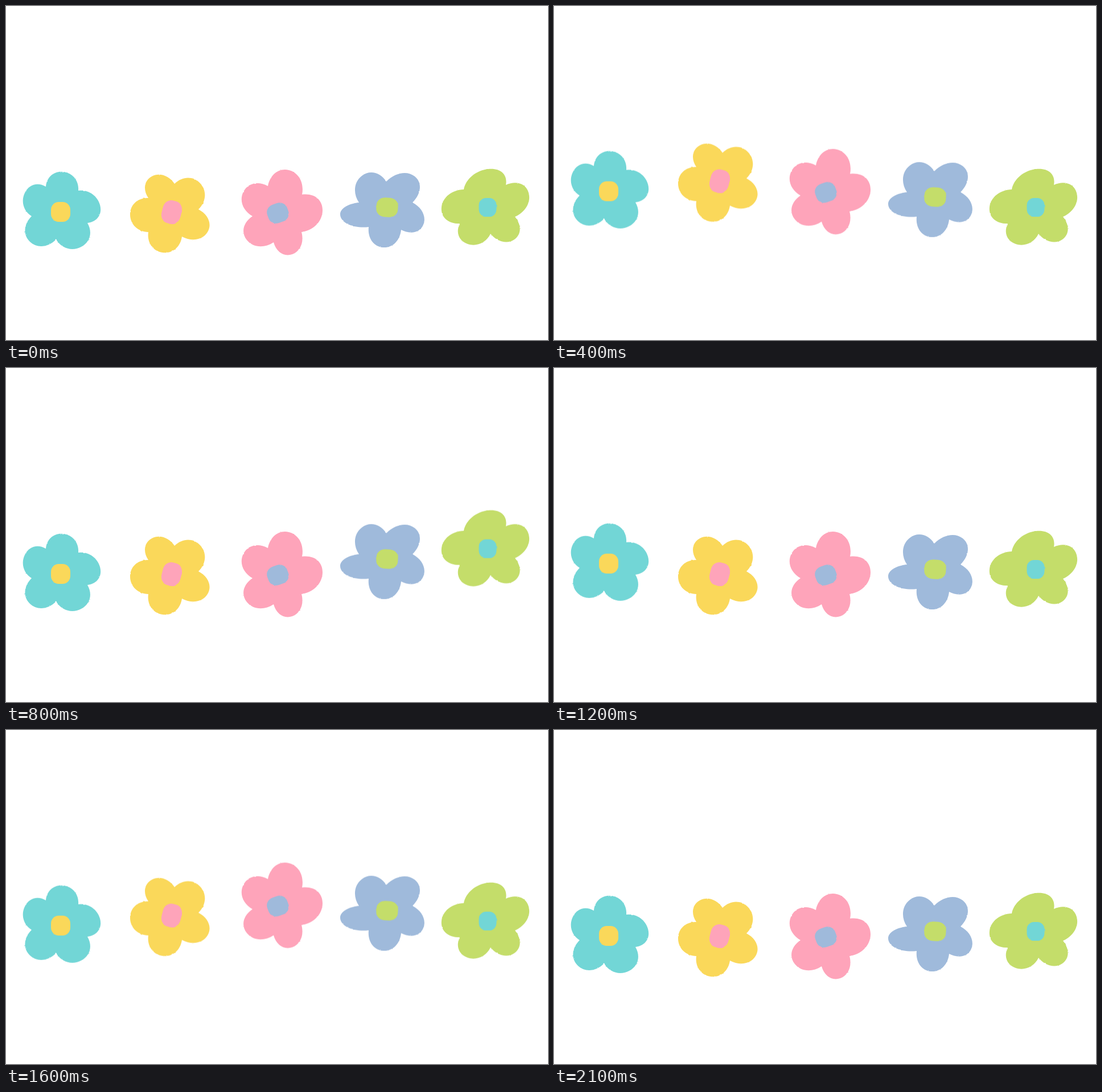
Animation, 952 px wide and 588 px high, one loop 2200 ms. Source, as an HTML page:

```html
<!DOCTYPE html>
<html lang="en">
<head>
<meta charset="utf-8">
<title>Bouncing flowers</title>
<style>
  html, body { margin: 0; width: 100%; height: 100%; overflow: hidden; background: #fff; }
  svg { display: block; width: 952px; height: 588px; }
  .flower { animation: hop 1100ms infinite; animation-delay: calc(var(--i) * 100ms); }
  /* Three hard steps up, three down, then rest. */
  @keyframes hop {
    0% { transform: translateY(0); animation-timing-function: steps(3, end); }
    27.2727% { transform: translateY(-54.6px); animation-timing-function: steps(3, end); }
    54.5454%, 100% { transform: translateY(0); }
  }
</style>
</head>
<body>
<svg id="stage" viewBox="0 0 952 588">
  <filter id="rough" x="-5%" y="-5%" width="110%" height="110%" color-interpolation-filters="sRGB">
    <feTurbulence type="fractalNoise" baseFrequency="0.2" numOctaves="2" seed="4"/>
    <feDisplacementMap in="SourceGraphic" scale="2" xChannelSelector="R" yChannelSelector="G"/>
  </filter>
</svg>
<script>
const teal = '#72d6d6', yellow = '#fad85a', pink = '#fea4ba', blue = '#9fbadb', green = '#c4dd6a';
const FULLNESS = 0.58; // 0.55 would make each petal exactly half an ellipse

// notches: where petals meet; tips: the outermost point of the petal after each notch.
const flowers = [
  {
    fill: teal, heart: yellow,
    notches: [[70, 318], [127, 325], [143, 382], [88, 411], [45, 370]],
    tips: [[101, 292], [165, 350], [132, 424], [42, 415], [33, 329]],
    core: { x: 96, y: 362.5, w: 34, h: 35, tilt: 0 }
  },
  {
    fill: yellow, heart: pink,
    notches: [[250, 338], [296, 313], [338, 358], [309, 406], [250, 398]],
    tips: [[256, 300], [341, 312], [354, 398], [275, 434], [218, 367]],
    core: { x: 291, y: 363, w: 34, h: 41, tilt: 14 }
  },
  {
    fill: pink, heart: blue,
    notches: [[460, 317], [520, 332], [519, 398], [470, 416], [433, 370]],
    tips: [[497, 289], [556, 360], [503, 437], [423, 412], [417, 327]],
    core: { x: 477.5, y: 364.5, w: 37, h: 34, tilt: -20 }
  },
  {
    fill: blue, heart: green,
    notches: [[620, 346], [668, 309], [714, 346], [694, 394], [637, 389]],
    tips: [[625, 299], [718, 300], [733, 385], [662, 425], [588, 372]],
    core: { x: 669.5, y: 354.5, w: 38, h: 34, tilt: 4 }
  },
  {
    fill: green, heart: teal,
    notches: [[804, 323], [878, 315], [894, 371], [851, 401], [797, 383]],
    tips: [[847, 287], [918, 329], [893, 411], [811, 419], [765, 354]],
    core: { x: 846, y: 354.5, w: 31, h: 33, tilt: 0 }
  }
];

const shift = (p, v, k) => p.map((c, i) => c + v[i] * k);

// A slanted half oval from notch a over the tip to notch b.
function petal(a, tip, b) {
  const half = a.map((c, i) => (b[i] - c) / 2);
  const rise = shift(tip, shift(a, half, 1), -1);
  return `C${shift(a, rise, FULLNESS)} ${shift(tip, half, -FULLNESS)} ${tip}` +
    `C${shift(tip, half, FULLNESS)} ${shift(b, rise, FULLNESS)} ${b}`;
}

function outline({ notches, tips }) {
  const petals = tips.map((tip, i) => petal(notches[i], tip, notches[(i + 1) % notches.length]));
  return `M${notches[0]}${petals.join('')}Z`;
}

function add(parent, tag, attrs) {
  const node = document.createElementNS('http://www.w3.org/2000/svg', tag);
  for (const key in attrs) node.setAttribute(key, attrs[key]);
  return parent.appendChild(node);
}

function addCore(parent, { x, y, w, h, tilt }, fill) {
  add(parent, 'rect', {
    x: -w / 2, y: -h / 2, width: w, height: h, rx: w * 0.4, ry: h * 0.4,
    transform: `translate(${x} ${y}) rotate(${tilt})`, fill
  });
}

const stage = document.getElementById('stage');
flowers.forEach((flower, i) => {
  const hop = add(stage, 'g', { class: 'flower', style: `--i:${i}` });
  const shape = add(hop, 'g', { filter: 'url(#rough)' });
  add(shape, 'path', { d: outline(flower), fill: flower.fill });
  addCore(shape, flower.core, flower.heart);
});
</script>
</body>
</html>
```
